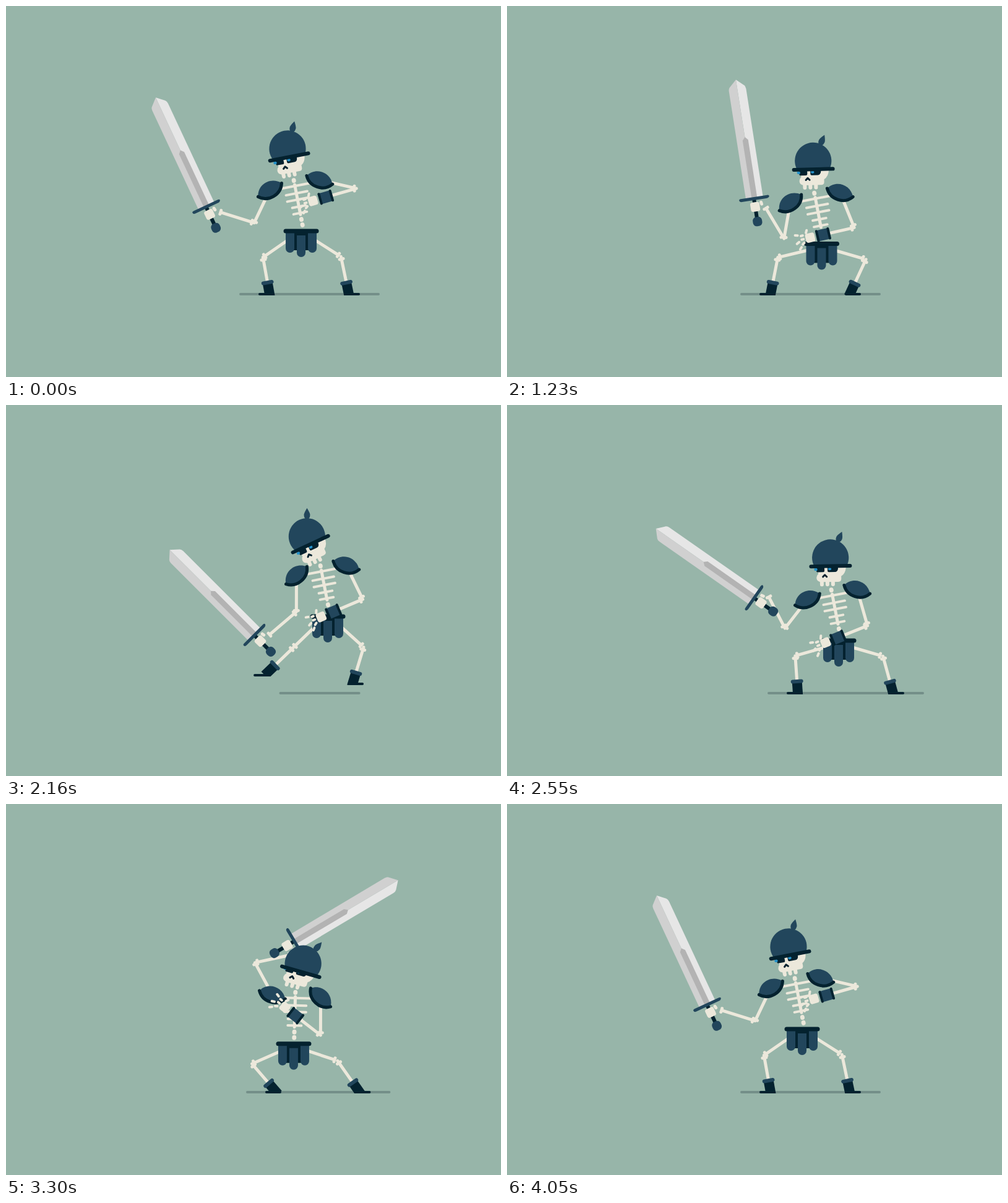
Recreate the animation shown at these times as an HTML page without scripts. Size 800 by 600 pixels, loop 4.08 s.

```html
<!DOCTYPE html>
<html lang="en">
<head>
<meta charset="utf-8">
<title>Skeleton fencer</title>
<style>
/* pose: hips, torso lean, head nod, sword hand (from the hips), blade turn, free arm, feet */
@property --x { syntax: "<number>"; inherits: true; initial-value: 477 }
@property --y { syntax: "<number>"; inherits: true; initial-value: 364 }
@property --lean { syntax: "<number>"; inherits: true; initial-value: -11 }
@property --nod { syntax: "<number>"; inherits: true; initial-value: 0 }
@property --hx { syntax: "<number>"; inherits: true; initial-value: 0 }
@property --hy { syntax: "<number>"; inherits: true; initial-value: 0 }
@property --cut { syntax: "<number>"; inherits: true; initial-value: 0 }
@property --up { syntax: "<number>"; inherits: true; initial-value: 0 }
@property --fore { syntax: "<number>"; inherits: true; initial-value: 0 }
@property --lx { syntax: "<number>"; inherits: true; initial-value: 426 }
@property --ly { syntax: "<number>"; inherits: true; initial-value: 466 }
@property --rx { syntax: "<number>"; inherits: true; initial-value: 554 }
@property --ry { syntax: "<number>"; inherits: true; initial-value: 466 }

html, body { margin: 0; width: 100%; height: 100%; overflow: hidden; background: #97b5a9 }
svg {
  display: block; width: 800px; height: 600px;
  animation: 4.08s cubic-bezier(.4, .1, .5, .95) infinite;
  animation-name: pose, travel, step;
}

@keyframes pose {
  /* ready */
  0%, 95.6%, 99.26%, 100% { --y: 364; --lean: -11; --nod: -11; --hx: -148; --hy: -27; --cut: -25; --up: 13; --fore: 164 }
  /* guard */
  11.76%, 14.71%, 58.8%, 66.2% { --y: 381; --lean: -11; --nod: -1; --hx: -125.5; --hy: -61; --cut: -55; --up: 74; --fore: 158 }
  /* upright */
  30.15% { --y: 384.5; --lean: -11; --nod: -1.5; --hx: -107.5; --hy: -59.5; --cut: -9; --up: 68; --fore: 167 }
  /* hop */
  52.94% { --y: 342; --lean: -11; --nod: -25; --hx: -109; --hy: 40; --cut: -45; --up: 64; --fore: 157 }
  /* lunge */
  16.9%, 22.8%, 43.4%, 46.3%, 69.1%, 75%, 90.4%, 91.9% { --y: 396; --lean: -33; --nod: -26; --hx: -181; --hy: -38; --cut: -85; --up: -27; --fore: 85 }
  /* overhead */
  36.8%, 40.7%, 84.6%, 88% { --y: 385; --lean: 13; --nod: 30; --hx: 46; --hy: -199; --cut: 107; --up: 129; --fore: 262 }
  /* draw back, chop low, swing up */
  11.76% { --hx: -65; --hy: -48 }
  90.4%, 91.9% { --hx: -171; --hy: 2; --cut: -110 }
  95.6% { --hx: -142; --hy: -64; --cut: -10 }
}
@keyframes travel {
  0%, 95.6%, 100% { --x: 477 }
  11.76%, 30.15%, 36.8%, 40.7% { --x: 508.5 }
  14.71% { --x: 491.5 }
  16.9%, 22.8%, 43.4%, 46.3%, 90.4%, 91.9% { --x: 456 }
  52.94% { --x: 520 }
  58.8%, 66.2% { --x: 536 }
  69.1%, 75% { --x: 507 }
  84.6%, 88% { --x: 451 }
}
@keyframes step {
  0%, 46.3%, 84.6%, 100% { --lx: 426; --rx: 554; --ly: 466; --ry: 466 }
  52.94% { --lx: 418; --rx: 560; --ly: 437; --ry: 451 }
  58.8%, 75% { --lx: 470; --rx: 624; --ly: 466; --ry: 466 }
}

/* torso: chest point, twist away from rest (0 to 1), both shoulders */
.rig {
  --a: calc(var(--lean) * 1deg);
  --c: calc(var(--cut) * 1deg);
  --cx: calc(1 + 60 * sin(var(--a)));
  --cy: calc(-16 - 60 * cos(var(--a)));
  --off: calc((var(--lean) + 11) / 23);
  --twist: max(var(--off), -1 * var(--off));
  --px: calc(7 * var(--twist) - 41);
  --py: calc(.5 - 5 * var(--twist));
  --sx: calc(var(--cx) + var(--px) * cos(var(--a)) - var(--py) * sin(var(--a)));
  --sy: calc(var(--cy) + var(--px) * sin(var(--a)) + var(--py) * cos(var(--a)));
  --tx: calc(var(--cx) + 41 * cos(var(--a)));
  --ty: calc(var(--cy) + 41 * sin(var(--a)));
}
.at { translate: calc(var(--u) * 1px) calc(var(--v) * 1px) }
.body { --u: var(--x); --v: var(--y) }
.chest { --u: var(--cx); --v: var(--cy); rotate: var(--a) }
.head { --u: calc(var(--cx) - 2); --v: calc(var(--cy) - 9); rotate: calc(var(--nod) * 1deg) }
.cap { --u: calc(3 * var(--twist)); --v: calc(6 * var(--twist)) }
.sword { --u: var(--hx); --v: var(--hy); rotate: var(--c) }

/* two equal bones reaching from a root to a point (dx, dy) */
.limb {
  --bend: calc(var(--side) * acos(min(1, hypot(var(--dx), var(--dy)) / (2 * var(--len)))));
}
.upper { rotate: calc(atan2(var(--dy), var(--dx)) + var(--bend)) }
.lower { translate: calc(var(--len) * 1px); rotate: calc(-2 * var(--bend)) }
.armL {
  --u: var(--sx); --v: var(--sy); --len: 59; --side: -1;
  --dx: calc(var(--hx) + 16 * cos(var(--c)) - 3 * sin(var(--c)) - var(--sx));
  --dy: calc(var(--hy) + 16 * sin(var(--c)) + 3 * cos(var(--c)) - var(--sy));
}
.armL .pad { rotate: calc(.38 * (180deg + atan2(-1 * var(--dy), -1 * var(--dx)) + var(--bend)) - 74deg) }
.legL, .legR { --v: calc(var(--y) + 8) }
.legL {
  --u: calc(var(--x) - 12); --len: 60.5; --side: 1;
  --dx: calc(var(--lx) - var(--u)); --dy: calc(var(--ly) - var(--v));
}
.legR {
  --u: calc(var(--x) + 12); --len: 62; --side: -1;
  --dx: calc(var(--rx) - var(--u)); --dy: calc(var(--ry) - var(--v));
}
.footL { --u: var(--lx); --v: var(--ly) }
.footR { --u: var(--rx); --v: var(--ry) }
.boot { translate: calc(var(--len) * 1px) }
#floorL rect { height: calc((var(--ly) + 2) * 1px) }
#floorR rect { height: calc((var(--ry) + 2) * 1px) }

.armR { --u: var(--tx); --v: var(--ty) }
.armR .turn { rotate: calc(var(--up) * 1deg) }
.armR .elbow { translate: 61px; rotate: calc((var(--fore) - var(--up)) * 1deg) }
.armR .pad { rotate: calc(min(46, 40 + 2 * var(--lean)) * 1deg) }

/* each end of the shadow draws in as its foot lifts */
.shade {
  --from: calc(var(--lx) - 49 + 2.5 * (466 - var(--ly)));
  --to: calc(var(--rx) + 50 - 2.5 * (466 - var(--ry)));
  x: calc(var(--from) * 1px);
  width: calc((var(--to) - var(--from)) * 1px);
}

.bone { fill: #ece8db }
.navy { fill: #22465c }
.dark { fill: #04222f }
.line, .rim { fill: none; stroke: #ece8db; stroke-width: 5; stroke-linecap: round; stroke-linejoin: round }
.rim { stroke: #04222f }
.thin { stroke-width: 4 }
.thick { stroke-width: 6 }
</style>
</head>
<body>
<svg viewBox="0 0 800 600">
  <defs>
    <clipPath id="floorL"><rect width="800"/></clipPath>
    <clipPath id="floorR"><rect width="800"/></clipPath>
    <path id="bone" class="line" d="M0 0H57M4-3v.1M4 3v.1M57-3v.1M57 3v.1"/>
    <g id="boot">
      <path class="dark" d="M-18-8H4V8H-18z"/>
      <path d="M-19-7V7" stroke="#22465c" stroke-width="6" stroke-linecap="round"/>
    </g>
    <g id="pad">
      <path class="navy" d="M-22 0C-13-18 12-18 22 0C13 16-12 16-22 0"/>
      <path class="rim" d="M-22 0C-12 16 12 16 22 0"/>
    </g>
    <path id="flap" class="navy" d="M-7 0H7V28a7 7 0 0 1-14 0z"/>
    <rect id="palm" class="bone" x="-7.5" y="-7.5" width="15" height="15" rx="3.5"/>
  </defs>

  <g class="rig">
    <rect class="shade" y="464" height="4" rx="2" fill="#748f89"/>

    <g clip-path="url(#floorL)">
      <g class="limb legL at"><g class="upper">
        <use href="#bone"/>
        <g class="lower"><use href="#bone"/><use class="boot" href="#boot"/></g>
      </g></g>
    </g>
    <path class="rim thin footL at" d="M-16 0H6"/>
    <g clip-path="url(#floorR)">
      <g class="limb legR at"><g class="upper">
        <use href="#bone"/>
        <g class="lower"><use href="#bone"/><use class="boot" href="#boot"/></g>
      </g></g>
    </g>
    <path class="rim thin footR at" d="M-6 0H16"/>

    <g class="body at">
      <g class="chest at">
        <path class="line" d="M0 0V49"/>
        <path class="line thin" d="M-22 2H27M-17 14H18M-17 24.5H18M-11 36H11M-11 46.5H11"/>
        <g class="bone">
          <ellipse cy="-7" rx="3.5" ry="4"/>
          <ellipse cy="57" rx="3.5" ry="4"/>
          <ellipse cy="66" rx="3.5" ry="4"/>
        </g>
      </g>

      <path class="dark" d="M-12 0H12V31H-12z"/>
      <use href="#flap" x="-18"/>
      <use href="#flap" x="18"/>
      <use href="#flap" y="7"/>
      <path class="rim" style="stroke-width:7" d="M-25 0H25"/>

      <g class="limb armL at">
        <g class="upper">
          <use href="#bone"/>
          <g class="lower"><use href="#bone"/></g>
        </g>
        <use class="pad" href="#pad"/>
      </g>

      <g class="sword at">
        <path fill="#e6e6e6" d="M1-15V-208L13-197Q15-195 15-191V-15z"/>
        <path fill="#d0d0d0" d="M1-15V-208L-11-197Q-13-195-13-191V-15z"/>
        <path fill="#b3b3b3" d="M-3.5-15V-109L1-114L5.5-109V-15z"/>
        <path class="rim thick" d="M0-12V20"/>
        <path class="navy" d="M-24-14Q-24-16-21-16H22Q25-16 25-14Q24-11 20-11H-20Q-24-11-24-14"/>
        <rect class="navy" x="-7.5" y="16.5" width="15" height="15" rx="6"/>
        <use href="#palm"/>
        <path class="line" d="M10.5-6l.5 3"/>
      </g>

      <g class="head at"><g transform="translate(0 -50)">
        <path class="bone" d="M-22 6H25V15Q24 26 17 30V34Q17 39 12 39H-16Q-23 38-23 32Q-22 27-20 26z"/>
        <path class="line thick" d="M-14.5 36v7M-5.5 36v7M3.5 36v7"/>
        <path class="dark" d="M-23 12h13v9q0 2-2 2h-9q-2 0-2-2zM-5 12h17v6q-1 5-5 5h-10q-2 0-2-2z"/>
        <g fill="#2592cb">
          <ellipse cx="-24" cy="18.5" rx="2.7" ry="2.3"/>
          <ellipse cx="-1.5" cy="18" rx="2.7" ry="2.2"/>
        </g>
        <path class="rim" style="stroke-width:3" d="M-12.5 30.5L-9.5 27.5L-6.5 30.5"/>
        <g class="cap at">
          <path class="navy" d="M0-46Q5-38 5-35Q5-31 3-29V-26H-3V-29Q-5-31-5-35Q-5-38 0-46" transform="rotate(25)"/>
          <path class="navy" d="M-26.5 13A29.6 29.6 0 1 1 26.5 13z"/>
          <path class="rim thick" d="M-31.5 13.5H31.5"/>
        </g>
      </g></g>

      <g class="armR at">
        <g class="turn">
          <use href="#bone"/>
          <g class="elbow">
            <path class="line" d="M0 0H45M4-3v.1M4 3v.1"/>
            <g transform="translate(73) rotate(180)">
              <path class="navy" d="M12-9H31V9H12z"/>
              <path class="rim thin" d="M12-8V8M31-8V8"/>
              <use href="#palm"/>
              <path class="line thin" d="M-3-13l-2 4M-11-6h-3M-11 0h-3M-11 6l-3 2M-19-8l-4-1M-19 3l-4 2M-17 12l-3 3"/>
            </g>
          </g>
        </g>
        <use class="pad" href="#pad"/>
      </g>
    </g>
  </g>
</svg>
</body>
</html>
```
